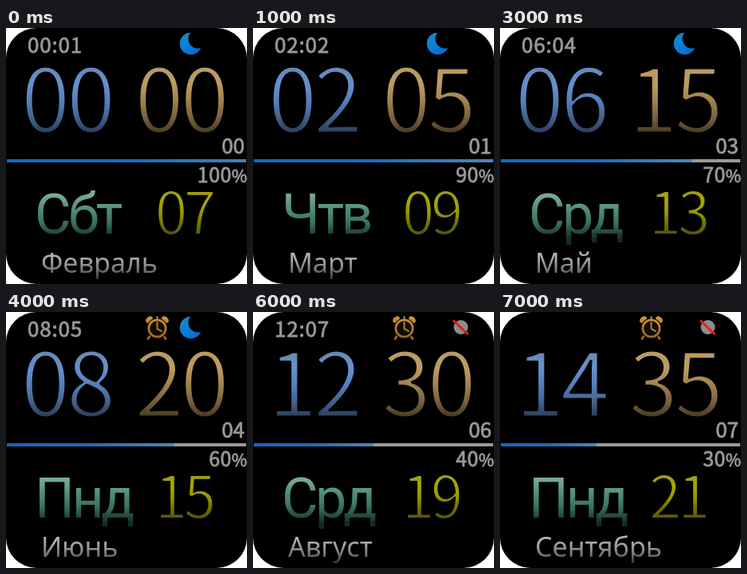
Recreate the animation shown at these times as an HTML page with a canvas. Size 302x320 px, loop 8 s.

```html
<!DOCTYPE html>
<html lang="ru">
<head>
<meta charset="utf-8">
<style>
  html, body { margin: 0; width: 100%; height: 100%; overflow: hidden; background: #fff; }
  canvas { display: block; }
</style>
</head>
<body>
<canvas id="face" width="302" height="320"></canvas>
<script>
const ctx = document.getElementById('face').getContext('2d');
const DIGITS = '"Noto Sans CJK SC", "Noto Sans CJK JP", "Noto Sans", sans-serif';
const MONTH_FONT = '34px "Noto Sans", "Open Sans", sans-serif';
const DAY_FONT = '70px Roboto, "Noto Sans", sans-serif';
const GREY = '#999';

const MONTHS = ['Февраль', 'Март', 'Апрель', 'Май', 'Июнь', 'Июль', 'Август', 'Сентябрь'];
const DAYS = ['Сбт', 'Чтв', 'Сбт', 'Срд', 'Пнд', 'Сбт', 'Срд', 'Пнд'];

const pad = n => String(n).padStart(2, '0');

function gradient(x0, y0, x1, y1, colors) {
  const g = ctx.createLinearGradient(x0, y0, x1, y1);
  colors.forEach((c, i) => g.addColorStop(i / (colors.length - 1), c));
  return g;
}

const vertical = (top, bottom, ...colors) => gradient(0, top, 0, bottom, colors);

function text(str, x, y, font, fill, { align = 'left', spacing = 0 } = {}) {
  ctx.font = font;
  ctx.fillStyle = fill;
  ctx.textAlign = align;
  ctx.letterSpacing = spacing + 'px';
  ctx.fillText(str, x, y);
}

// An outline in the text colour makes it heavier, a black one lighter.
function outline(str, x, y, color, width) {
  ctx.lineJoin = 'round';
  ctx.strokeStyle = color;
  ctx.lineWidth = width;
  ctx.strokeText(str, x, y);
}

function label(str, x, y, size, options) {
  text(str, x, y, `${size}px ${DIGITS}`, GREY, options);
  outline(str, x, y, GREY, 0.8);
}

// Each digit sits centred in its own cell.
function thinDigits(str, center, step, y, size, fill) {
  [...str].forEach((c, i) => {
    const x = center + i * step;
    text(c, x, y, `${size}px ${DIGITS}`, fill, { align: 'center' });
    outline(c, x, y, '#000', size * 0.026);
  });
}

function disc(x, y, r, fill) {
  ctx.beginPath();
  ctx.arc(x, y, r, 0, Math.PI * 2);
  ctx.fillStyle = fill;
  ctx.fill();
}

function line(color, width, ...points) {
  ctx.beginPath();
  points.forEach(([x, y]) => ctx.lineTo(x, y));
  ctx.strokeStyle = color;
  ctx.lineWidth = width;
  ctx.stroke();
}

function moon() {
  disc(231.5, 19.5, 13.7, gradient(224, 8, 238, 32, ['#1488c4', '#0a7edb', '#0c68cc']));
  disc(240.5, 13.5, 12, '#000');
}

function alarm() {
  const color = vertical(5, 35, '#c8953a', '#b67c2c', '#945f22');
  ctx.lineCap = 'round';
  line(color, 3, [181, 29], [178, 33.5]);
  line(color, 3, [197, 29], [200, 33.5]);
  for (const side of [-1, 1]) {
    ctx.beginPath();
    ctx.ellipse(189.5 + side * 10, 9.5, 5, 3.5, side * 0.7, 0, Math.PI * 2);
    ctx.fillStyle = color;
    ctx.fill();
  }
  disc(189.5, 20.5, 13, '#000');
  disc(189.5, 20.5, 12, color);
  disc(189.5, 20.5, 9.3, '#100b04');
  line(color, 2, [189.5, 13], [189.5, 21], [195, 24]);
  line(color, 2, [189.5, 6], [189.5, 8]);
  ctx.lineCap = 'butt';
}

function offline() {
  disc(260.5, 19, 9, '#8c8c8c');
  line('#e81c24', 3, [251, 10.5], [269.5, 28]);
}

function battery(level) {
  const end = 31 + level * 3;
  ctx.fillStyle = '#999';
  ctx.fillRect(1, 164, 300, 4);
  ctx.fillStyle = gradient(1, 0, end, 0, ['#1068c0', '#1b6dbc', '#5583b4']);
  ctx.fillRect(1, 164, Math.min(301, end) - 1, 4);
  label('%', 302, 193, 21, { align: 'right' });
  label(String(level), 283, 193, 25, { align: 'right', spacing: 0.5 });
}

function draw(step) {
  ctx.fillStyle = '#fff';
  ctx.fillRect(0, 0, 302, 320);
  ctx.beginPath();
  ctx.roundRect(0, 0, 302, 320, 38);
  ctx.fillStyle = '#000';
  ctx.fill();

  const hour = pad(step * 2);
  if (step < 7) label(`${hour}:${pad(step + 1)}`, 27, 31, 26, { spacing: 0.8 });

  thinDigits(hour, 49.5, 57, 131, 111,
    vertical(49, 132, '#6888b4', '#6690cc', '#5580bd', '#44648f', '#2a3b56'));
  thinDigits(pad(step * 5), 192, 57, 131, 111,
    vertical(49, 132, '#b89a64', '#bc9c60', '#a1834e', '#78633e', '#453822'));
  label(pad(step), 299, 157, 26, { align: 'right' });

  battery(100 - step * 10);

  text(DAYS[step], 36, 257, DAY_FONT,
    vertical(205, 264, '#80b09e', '#55917d', '#376f5e', '#152a22'), { spacing: -3.5 });
  thinDigits(pad(7 + step * 2), 207, 36, 257.5, 73,
    vertical(203, 259, '#9c9c14', '#a6a800', '#979800', '#727200', '#53530e'));
  text(MONTHS[step], 44, 306, MONTH_FONT,
    vertical(280, 314, '#b8b8b8', '#a2a2a2', '#757575', '#333'));

  if (step < 5) moon();
  if (step > 3) alarm();
  if (step > 4) offline();
}

const start = performance.now();
function tick() {
  draw(Math.floor((performance.now() - start) / 1000) % 8);
  requestAnimationFrame(tick);
}
tick();
</script>
</body>
</html>
```
